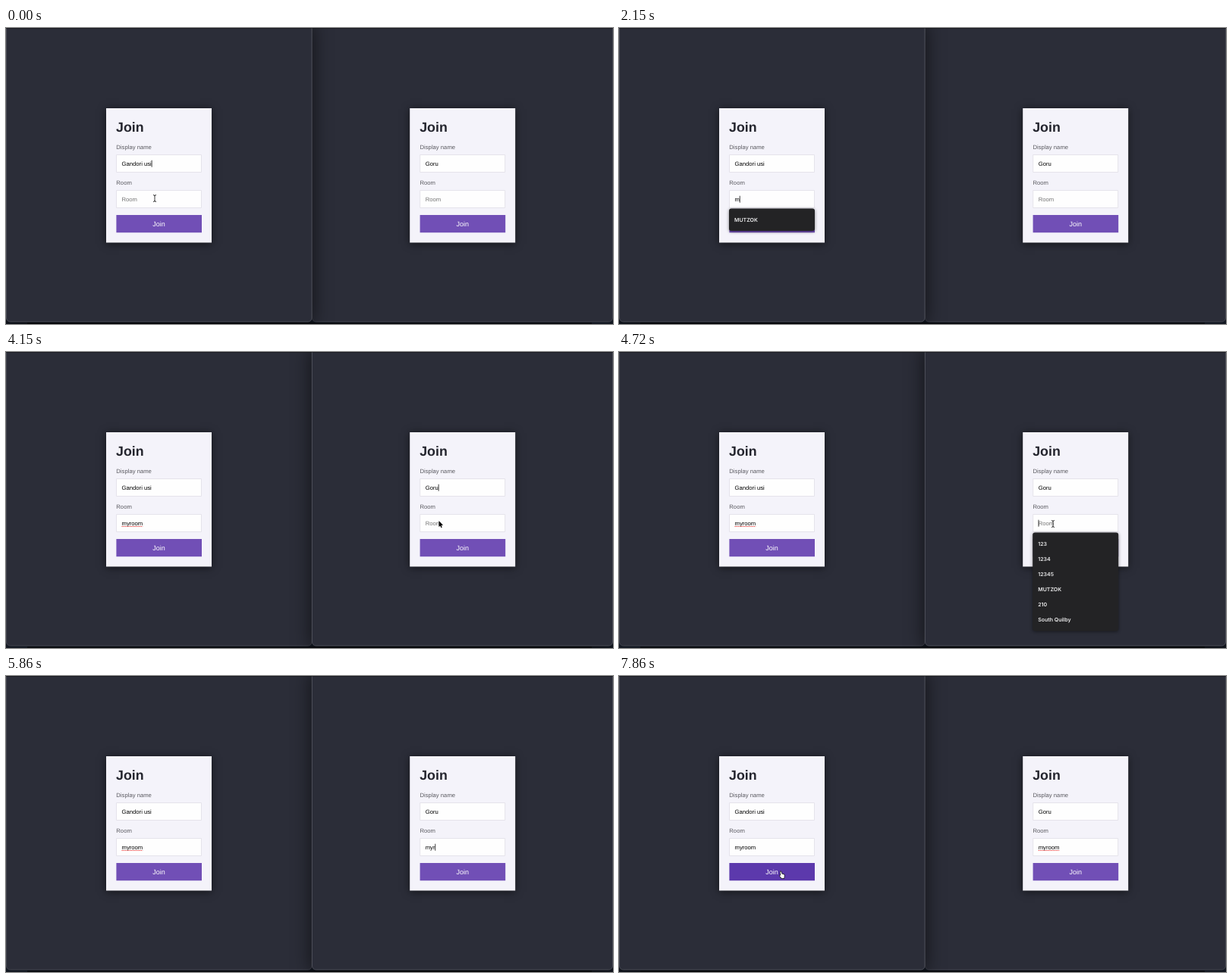
Animation of 800 by 391 pixels, one loop 8 s. Source, as an HTML page with a canvas:

```html
<!DOCTYPE html>
<html lang="en">
<head>
<meta charset="utf-8">
<title>Join room</title>
<style>
  html, body { margin: 0; width: 100%; height: 100%; overflow: hidden; background: #0e1118; }
  canvas { display: block; }
</style>
</head>
<body>
<canvas id="stage" width="800" height="391"></canvas>
<script>
const ctx = document.getElementById('stage').getContext('2d');
ctx.textRendering = 'geometricPrecision';

const LOOP = 8000;
const SANS = '"Liberation Sans", Arial, sans-serif';
const BODY = `7.7px ${SANS}`;
const ROOMS = ['123', '1234', '12345', 'MUTZOK', '210', 'South Quilby'];
const MATCH = ['MUTZOK'];
const NAMES = ['Gandori usi', 'Goru'];
const NAME_Y = 167.5, ROOM_Y = 214.5;

// Each track lists [start time, value]; a value holds until the next one.
const TRACKS = {
  front: [[0, 0], [4000, 1], [7000, 0]],
  leftRoom: [[0, ''], [2000, 'm'], [2290, 'my'], [2720, 'myr'], [2860, 'myro'], [3000, 'myroo'], [3150, 'myroom']],
  rightRoom: [[0, ''], [5150, 'm'], [5430, 'my'], [5860, 'myr'], [6000, 'myro'], [6150, 'myroo'], [6430, 'myroom']],
  leftCaret: [[0, 'name'], [430, ''], [860, 'room'], [1430, ''], [1860, 'room'], [3720, ''], [7000, 'room'], [7430, '']],
  rightCaret: [[0, ''], [4000, 'name'], [4570, ''], [4720, 'room'], [7000, '']],
  leftList: [[0, null], [860, ROOMS], [2150, MATCH], [2290, null]],
  rightList: [[0, null], [4720, ROOMS], [5290, MATCH], [5430, null]],
  leftMarked: [[0, false], [4000, true], [7000, false]],
  rightMarked: [[0, false], [7000, true]],
  cursor: [
    [0, ['beam', 196, 225]], [2000, null],
    [3430, ['beam', 214, 227]], [3570, ['arrow', 322, 232]], [3720, ['arrow', 468, 229]],
    [3860, ['arrow', 556, 224]], [4000, ['arrow', 570.5, 223]],
    [4720, ['beam', 572, 227]], [5150, null],
    [6720, ['arrow', 253, 241]], [6860, ['arrow', 228, 252]], [7000, ['arrow', 215, 258]],
    [7150, ['arrow', 212.5, 258.5]], [7430, ['hand', 212.5, 258.5]]
  ]
};

function at(track, t) {
  let value = track[0][1];
  for (const [start, next] of track) if (t >= start) value = next;
  return value;
}

function box(x, y, w, h, fill, stroke, radius = 0) {
  ctx.beginPath();
  ctx.roundRect(x, y, w, h, radius);
  if (fill) { ctx.fillStyle = fill; ctx.fill(); }
  if (stroke) { ctx.strokeStyle = stroke; ctx.lineWidth = 1; ctx.stroke(); }
}

function shadowed(color, blur, dy, draw) {
  ctx.save();
  ctx.shadowColor = color;
  ctx.shadowBlur = blur;
  ctx.shadowOffsetY = dy;
  draw();
  ctx.restore();
}

function text(str, x, y, font, color, align = 'left') {
  ctx.font = font;
  ctx.fillStyle = color;
  ctx.textAlign = align;
  ctx.fillText(str, x, y);
}

function field(y, value, placeholder, caret, marked) {
  box(145.5, y, 112, 23, '#fefefe', '#e5e3eb');
  text(value || placeholder, 152.5, y + 14.6, BODY, value ? '#000' : '#757575');
  const width = ctx.measureText(value).width;
  if (marked) {
    ctx.save();
    ctx.strokeStyle = '#e8504e';
    ctx.setLineDash([1.4, 0.7]);
    ctx.beginPath();
    ctx.moveTo(152.5, y + 16);
    ctx.lineTo(152.5 + width, y + 16);
    ctx.stroke();
    ctx.restore();
  }
  if (caret) {
    ctx.fillStyle = '#111';
    ctx.fillRect(152.4 + width, y + 7.2, 0.8, 9);
  }
}

function dropdown(items) {
  shadowed('rgba(0,0,0,.45)', 4, 1, () =>
    box(145, 238.5, 113, 9.5 + 20 * items.length + (items.length > 1 ? 0.5 : 0), '#232325', null, 3));
  items.forEach((item, i) =>
    text(item, 152, 255.8 + 20 * i, '600 7px Inter, sans-serif', '#ededee'));
}

function form(dx, name, room, caret, list, marked, hover) {
  ctx.save();
  ctx.translate(dx, 0);
  shadowed('rgba(0,0,0,.55)', 10, 1, () => box(132, 106, 139, 177.5, '#f4f3fa'));
  text('Join', 145, 137.4, `bold 17.8px ${SANS}`, '#24252e');
  text('Display name', 145.3, 160, BODY, '#5a5a60');
  text('Room', 145.3, 207.4, BODY, '#5a5a60');
  field(NAME_Y, name, '', caret === 'name', false);
  field(ROOM_Y, room, 'Room', caret === 'room', marked);
  box(145.4, 247, 112.6, 23.3, `rgb(${113 - 21 * hover},${79 - 22 * hover},${182 - 10 * hover})`);
  text('Join', 201.6, 261.6, `9px ${SANS}`, '#fff', 'center');
  if (list) dropdown(list);
  ctx.restore();
}

function windowPane(index, isFront) {
  const x = index ? 403.5 : 0.5;
  const w = index ? 396 : 402.5;
  const draw = () => box(x, -9.5, w, 397.5, '#2b2d38', null, 5);
  if (isFront) shadowed('rgba(0,0,0,.65)', 26, 3, draw);
  else draw();
  box(x, -9.5, w, 397.5, null, isFront ? '#4a4c56' : '#42444e', 5);
}

function outline(points, x, y) {
  ctx.beginPath();
  points.forEach(([px, py]) => ctx.lineTo(x + px, y + py));
  ctx.closePath();
  ctx.lineJoin = 'round';
}

function drawCursor([kind, x, y]) {
  if (kind === 'beam') {
    ctx.strokeStyle = '#222';
    ctx.lineWidth = 0.9;
    ctx.beginPath();
    for (const s of [-1, 1]) {
      ctx.moveTo(x - 2, y + 4.5 * s);
      ctx.quadraticCurveTo(x, y + 4.5 * s, x, y + 3 * s);
      ctx.quadraticCurveTo(x, y + 4.5 * s, x + 2, y + 4.5 * s);
    }
    ctx.moveTo(x, y - 3.5);
    ctx.lineTo(x, y + 3.5);
    ctx.stroke();
    return;
  }
  const arrow = kind === 'arrow';
  outline(arrow
    ? [[0, 0], [0, 8], [1.8, 6.4], [3, 9.2], [4.3, 8.6], [3.1, 5.9], [5.5, 5.8]]
    : [[0, 0], [1.2, 0], [2, 3], [4.5, 3.4], [5.4, 4.5], [5, 8.6], [2, 8.8], [-0.8, 5.4], [-0.2, 4.8], [0.8, 5.3]], x, y);
  ctx.lineWidth = arrow ? 1 : 1.3;
  ctx.strokeStyle = arrow ? '#fff' : '#111';
  ctx.stroke();
  ctx.fillStyle = arrow ? '#000' : '#fff';
  ctx.fill();
}

function render(t) {
  const now = Object.fromEntries(Object.entries(TRACKS).map(([key, track]) => [key, at(track, t)]));
  const hover = Math.min(1, Math.max(0, (t - 7400) / 250));

  box(0, 0, 800, 391, '#131822');
  box(28, 389, 744, 2, '#090b10');
  windowPane(1 - now.front, false);
  windowPane(now.front, true);
  ctx.fillStyle = 'rgba(0,0,0,.4)';
  ctx.fillRect(0, 0, 800, 1);

  form(0, NAMES[0], now.leftRoom, now.leftCaret, now.leftList, now.leftMarked, hover);
  form(400.2, NAMES[1], now.rightRoom, now.rightCaret, now.rightList, now.rightMarked, 0);
  if (now.cursor) drawCursor(now.cursor);
}

function tick() {
  render(performance.now() % LOOP);
  requestAnimationFrame(tick);
}
tick();
</script>
</body>
</html>
```
